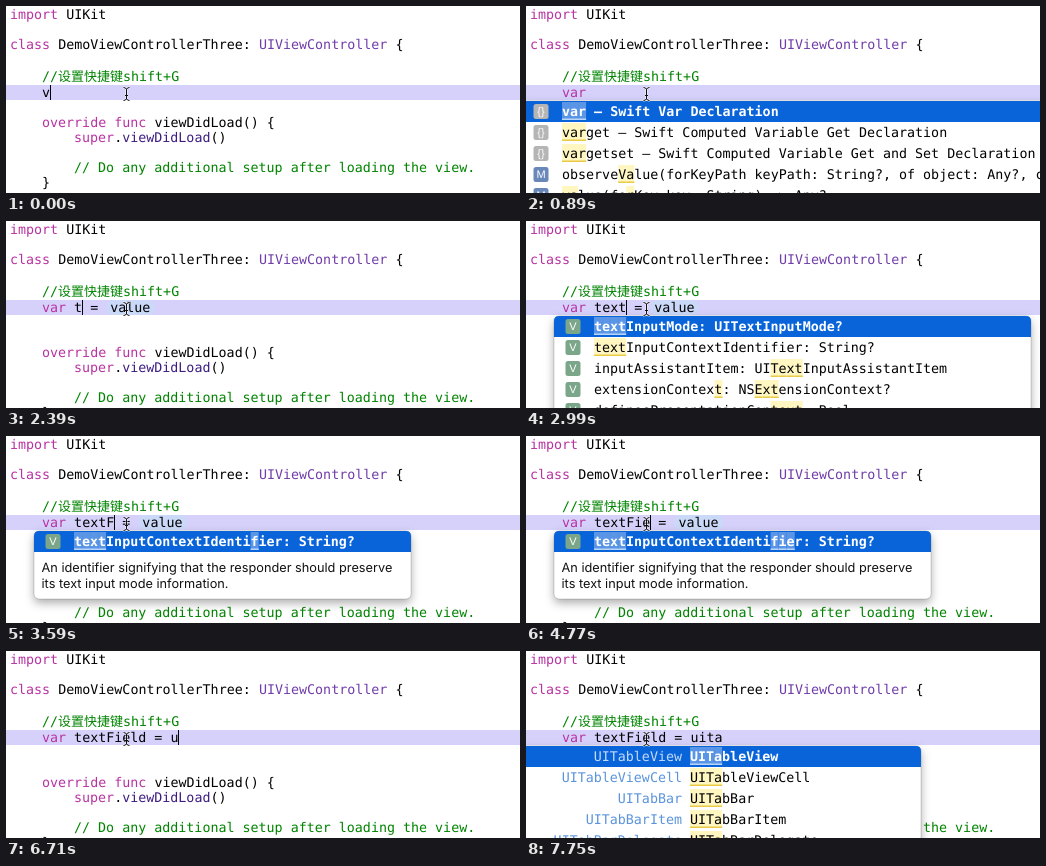
Animation, 514 px wide and 187 px high, one loop 8 s. Source, as an HTML page:

```html
<!DOCTYPE html>
<html lang="en">
<head>
<meta charset="utf-8">
<title>Code completion</title>
<style>
  html, body { margin: 0; width: 100%; height: 100%; overflow: hidden; background: #fff; }
  svg { display: block; width: 514px; height: 187px; }
  text { font: 13.34px "DejaVu Sans Mono", monospace; white-space: pre; text-rendering: geometricPrecision; }
  .cjk { font: 13px "Noto Sans CJK SC", "Noto Sans CJK", sans-serif; }
  .bold { font-weight: bold; }
  .icon { font: 11px "Liberation Sans", sans-serif; text-anchor: middle; }
  .desc { font: 12.75px Inter, sans-serif; }
  .end { text-anchor: end; }
  .shadow { filter: drop-shadow(0 4px 5px rgba(0, 0, 0, .32)); }
</style>
</head>
<body>
<svg id="stage" viewBox="0 0 514 187">
  <g id="code"></g>
  <g id="popup"></g>
  <g id="pointer" fill="none">
    <path d="M117 81.500q3 0 3.500 2q.5-2 3.500-2M120.500 83V93M117 94.500q3 0 3.500-2q.5 2 3.500 2M119 89.500h3" stroke="#fff" stroke-width="2.400" opacity=".55"/>
    <path d="M117.500 81.500q2.500 0 3 2q.5-2 3-2M120.500 83V93M117.500 94.500q2.500 0 3-2q.5 2 3 2M119 89.500h3" stroke="#111"/>
  </g>
</svg>
<script>
const LOOP = 8000, CW = 8.03, LEFT = 4, INDENT = 36, ROW = 21, TOP = 95;
const C = {
  key: '#b833a1', type: '#703daa', call: '#3d1d81', comment: '#008400',
  band: '#d5d1fb', pill: '#cbd9f8', picked: '#5d80c3', blue: '#0a64d9'
};
const ICONS = { '{}': '#b5b5b5', M: '#6a87b9', V: '#7ba68a' };

// Brackets mark the letters that match what has been typed.
const varRows = [
  ['{}', '[var] – Swift Var Declaration'],
  ['{}', '[var]get – Swift Computed Variable Get Declaration'],
  ['{}', '[var]getset – Swift Computed Variable Get and Set Declaration'],
  ['M', 'observe[Va]lue(forKeyPath keyPath: String?, of object: Any?, change: Any?)'],
  ['M', '[va]lue(fo[r]Key key: String) -> Any?']
];
const vaRows = [...varRows.slice(0, 3), varRows[4], ['M', '[va]lue(forKeyPath keyPath: String) -> Any?']];
const textRows = [
  ['V', '[text]InputMode: UITextInputMode?'],
  ['V', '[text]InputContextIdentifier: String?'],
  ['V', 'inputAssistantItem: UI[Text]InputAssistantItem'],
  ['V', 'extensionContex[t]: NS[Ext]ensionContext?'],
  ['V', 'definesPresentationCon[text]: Bool']
];
const fieldRows = [['V', '[text]InputContextIdenti[fie]r: String?']];
const uiRows = names => names.split(' ').map(s => ['', `[${s.slice(0, 4)}]${s.slice(4)}`, s]);
const uitRows = uiRows('UITableView UITextField UITabBar UITextView UITabBarItem');
const uitaRows = uiRows('UITableView UITableViewCell UITabBar UITabBarItem UITabBarDelegate');

const varList = (rows, n) => ({ rows, n, left: -5, right: 530, x: 36 });
const textList = (n, right, shadow = true) => ({ rows: textRows, n, left: 28, right, x: 68, shadow });
const fieldList = (n, fade = 1) => ({
  rows: fieldRows, n, left: 28, right: 405, x: 68, fade,
  desc: ['An identifier signifying that the responder should preserve', 'its text input mode information.']
});
const uiList = (rows, n, right) => ({ rows, n, left: -30, right, x: 164 });

// | is the caret, <x> a placeholder, {x} a selected placeholder.
const steps = [
  [0, 'v|'],
  [150, 'va|', varList(vaRows, 2)],
  [450, 'var|', varList(varRows, 3)],
  [890, 'var', varList(varRows, 3)],
  [1340, 'var {name} = <value>'],
  [2390, 'var t| = <value>'],
  [2540, 'var te| = <value>', textList(2, 530, false)],
  [2690, 'var te| = <value>', textList(2, 530)],
  [2840, 'var tex| = <value>', textList(3, 505)],
  [2990, 'var text| = <value>', textList(4, 505)],
  [3590, 'var textF| = <value>', fieldList(5)],
  [4040, 'var textF = <value>', fieldList(5)],
  [4180, 'var textFi| = <value>', fieldList(6)],
  [4630, 'var textFie| = <value>', fieldList(6)],
  [4770, 'var textFie| = <value>', fieldList(7)],
  [4920, 'var textFiel| = <value>', fieldList(7, .5)],
  [5070, 'var textFiel| = <value>'],
  [5220, 'var textField| = <value>'],
  [5810, 'var textField = <value>'],
  [5960, 'var textField = {value}'],
  [6710, 'var textField = u|'],
  [6860, 'var textField = uit|'],
  [7010, 'var textField = uit|', uiList(uitRows, 3, 373)],
  [7150, 'var textField = uita|', uiList(uitaRows, 4, 395)],
  [7750, 'var textField = uita', uiList(uitaRows, 4, 395)]
];

const esc = s => s.replace(/&/g, '&amp;').replace(/</g, '&lt;').replace(/>/g, '&gt;');
const text = (x, y, s, fill = '#000', cls = '') => `<text x="${x}" y="${y}" fill="${fill}" class="${cls}">${esc(s)}</text>`;
const rect = (x, y, w, h, fill, extra = '') => `<rect x="${x}" y="${y}" width="${w}" height="${h}" fill="${fill}" ${extra}/>`;

// Coloured runs of monospaced text: run(x, y, string, colour, string, colour, ...)
function run(x, y, ...parts) {
  let out = '';
  for (let i = 0; i < parts.length; i += 2) {
    out += text(x, y, parts[i], parts[i + 1]);
    x += parts[i].length * CW;
  }
  return out;
}

function drawLine(src) {
  let x = INDENT, out = src.includes('{') ? '' : rect(0, 79, 514, 15, C.band), caret = '';
  for (const tok of src.match(/<\w+>|\{\w+\}|\||^var\b|[^<{|]+/g)) {
    if (tok === '|') {
      caret = rect(Math.floor(x), 79, 1, 15, '#000');
    } else if (/^[<{]/.test(tok)) {
      const word = tok.slice(1, -1), on = tok[0] === '{', w = word.length * CW + 8;
      out += rect(x, 79, w, 15, on ? C.picked : C.pill, 'rx="6"') + text(x + 4, 91, word, on ? '#fff' : '#000');
      x += w;
    } else {
      out += text(x, 91, tok, tok === 'var' ? C.key : '#000');
      x += tok.length * CW;
    }
  }
  return out + caret;
}

function drawCode(src, shift) {
  const y = n => n + shift;
  return run(LEFT, 13, 'import', C.key, ' UIKit', '#000')
    + run(LEFT, 43, 'class', C.key, ' DemoViewControllerThree: ', '#000', 'UIViewController', C.type, ' {', '#000')
    + text(INDENT, 75, '//', C.comment) + text(52, 75, '设置快捷键', C.comment, 'cjk') + text(117, 75, 'shift+G', C.comment)
    + drawLine(src)
    + run(INDENT, y(121), 'override func', C.key, ' viewDidLoad() {', '#000')
    + run(68, y(136), 'super', C.key, '.', '#000', 'viewDidLoad', C.call, '()', '#000')
    + text(68, y(166), '// Do any additional setup after loading the view.', C.comment)
    + text(INDENT, y(181), '}');
}

function drawRow([icon, label, type], i, { x, n }) {
  const y = TOP + i * ROW, on = i === 0, ink = on ? '#fff' : '#000';
  let out = '', plain = '', inside = false;
  for (const ch of label) {
    if (ch === '[' || ch === ']') { inside = ch === '['; continue; }
    if (inside && n-- > 0) {
      const cx = x + plain.length * CW;
      out += rect(cx, y + 1, CW, 18, on ? '#5a95e6' : '#fff6c0') + rect(cx, y + 17.5, CW, 1.5, on ? '#b9d5fa' : '#e9ca45');
    }
    plain += ch;
  }
  if (icon) {
    out += rect(x - 28.5, y + 3, 15, 15, ICONS[icon], 'rx="2.500"')
      + text(x - 21, y + 14.4, icon, '#fff', 'icon');
  }
  if (type) out += text(x - 8, y + 15, type, on ? '#c3dbfa' : '#5b94dc', 'end');
  return out + text(x, y + 15, plain, ink, on ? 'bold' : '');
}

function drawPopup(p) {
  if (!p) return '';
  const w = p.right - p.left, h = p.desc ? 68 : 120;
  const r = p.left + 5, e = p.right - 5;
  const head = `M${p.left} ${TOP + ROW}v-16q0-5 5-5H${e}q5 0 5 5v16z`;
  return `<g opacity="${p.fade ?? 1}">`
    + rect(p.left, TOP, w, h, '#fff', `rx="5" stroke="#000" stroke-opacity=".16" ${p.shadow === false ? '' : 'class="shadow"'}`)
    + `<path d="${head}" fill="${C.blue}"/>`
    + p.rows.map((row, i) => drawRow(row, i, p)).join('')
    + (p.desc || []).map((s, i) => text(35.5, 135.5 + i * 16, s, '#111', 'desc')).join('')
    + '</g>';
}

const code = document.getElementById('code'), popup = document.getElementById('popup');
let shown = -1;

function render(ms) {
  const t = ms % LOOP;
  let i = steps.length - 1;
  while (steps[i][0] > t) i--;
  if (i === shown) return;
  shown = i;
  const [at, src, list] = steps[i];
  code.innerHTML = drawCode(src, at >= 1340 ? 15 : 0);
  popup.innerHTML = drawPopup(list);
}

const start = performance.now();
function tick() {
  render(performance.now() - start);
  requestAnimationFrame(tick);
}
tick();
</script>
</body>
</html>
```
